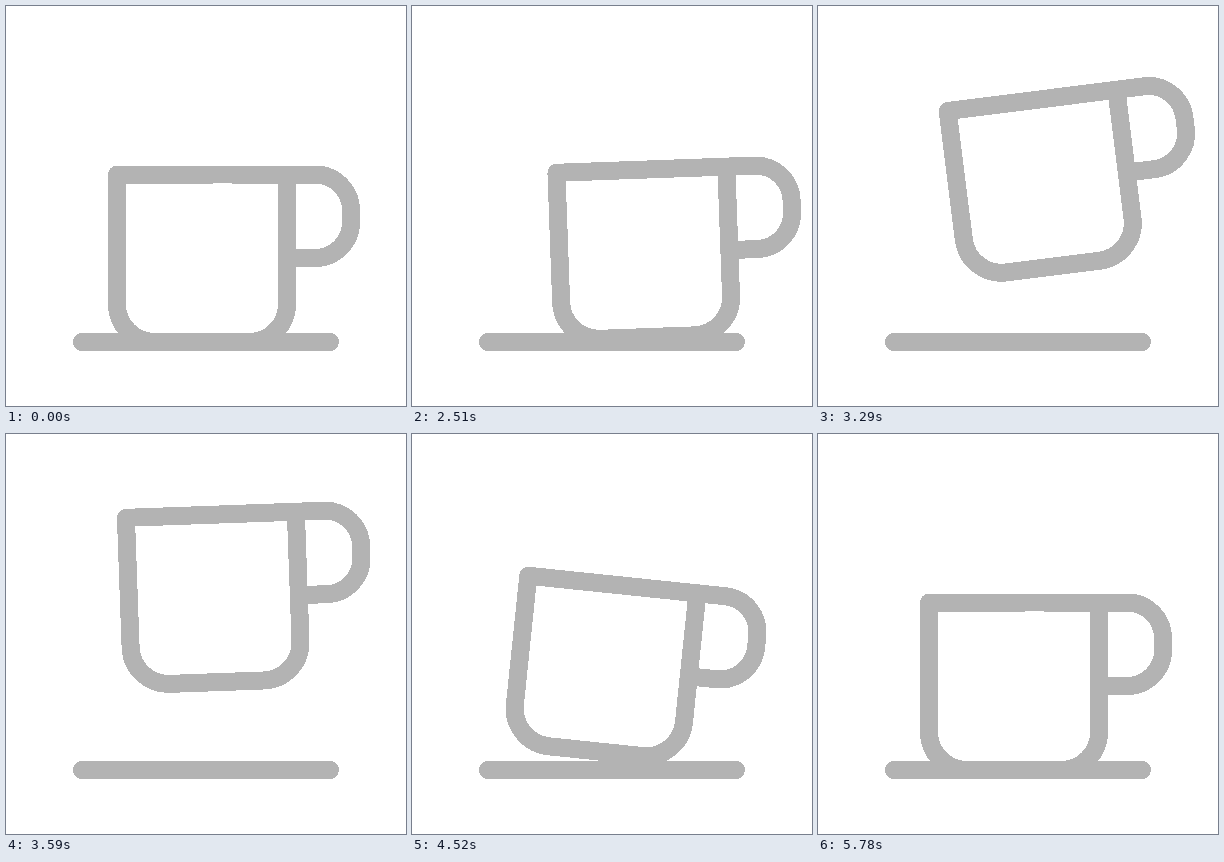
Write an HTML page that moves like this. It is 400 px wide and 400 px high and loops after 5.84 s.

```html
<!DOCTYPE html>
<html lang="en">
<head>
<meta charset="utf-8">
<title>Lifting cup</title>
<style>
  html, body { margin: 0; height: 100%; overflow: hidden; background: #fff; }
  svg { display: block; width: 100vw; height: 100vh; shape-rendering: crispEdges; }
  path { fill: none; stroke: #b3b3b3; stroke-width: 18; stroke-linecap: round; stroke-linejoin: round; }
</style>
</head>
<body>
<svg viewBox="0 0 400 400">
  <path d="M76 336H324"/>
  <g id="cup">
    <path d="M111 168.5H281V298a38 38 0 0 1-38 38H149a38 38 0 0 1-38-38Z"/>
    <path d="M281 168.5H309a36 36 0 0 1 36 36V216a36 36 0 0 1-36 36H281"/>
  </g>
  <rect id="glint" x="207" y="177" height="1" fill="#fff"/>
</svg>
<script>
const LOOP = 5840, START = 2000, END = 5000, STEP = 30;
const cup = document.getElementById('cup');
const glint = document.getElementById('glint');

const clamp = (v, lo, hi) => Math.min(hi, Math.max(lo, v));

// Progress from 0 to 1 between two times, eased at both ends
const ease = (t, from, to) => (1 - Math.cos(Math.PI * clamp((t - from) / (to - from), 0, 1))) / 2;

// Quick swing to 1 at the peak time, then a slow return
function swing(t, peak) {
  const s = (t - START) / (peak - START);
  return (s * Math.exp(1 - s)) ** 4.4;
}

function draw(now) {
  const t = now % LOOP;
  const move = clamp(START + Math.floor((t - START) / STEP) * STEP, START, END);

  const x = 48 * swing(move, 2765);
  const y = 88 * (ease(move, 3880, 4790) - ease(move, 2310, 3620));
  const tilt = 16.6 * ease(move, 3090, 4280)
    - 8.3 * (ease(move, 2220, 3090) + ease(move, 4280, 4950));
  cup.setAttribute('transform', `translate(${x} ${y}) rotate(${tilt} 200 211.5)`);

  const grown = t < START + 2 * STEP ? 1 : clamp((t - 5120) / 240, 0, 1);
  glint.setAttribute('width', 19 * grown);
}

const begin = performance.now();
function tick() {
  draw(performance.now() - begin);
  requestAnimationFrame(tick);
}
tick();
</script>
</body>
</html>
```
